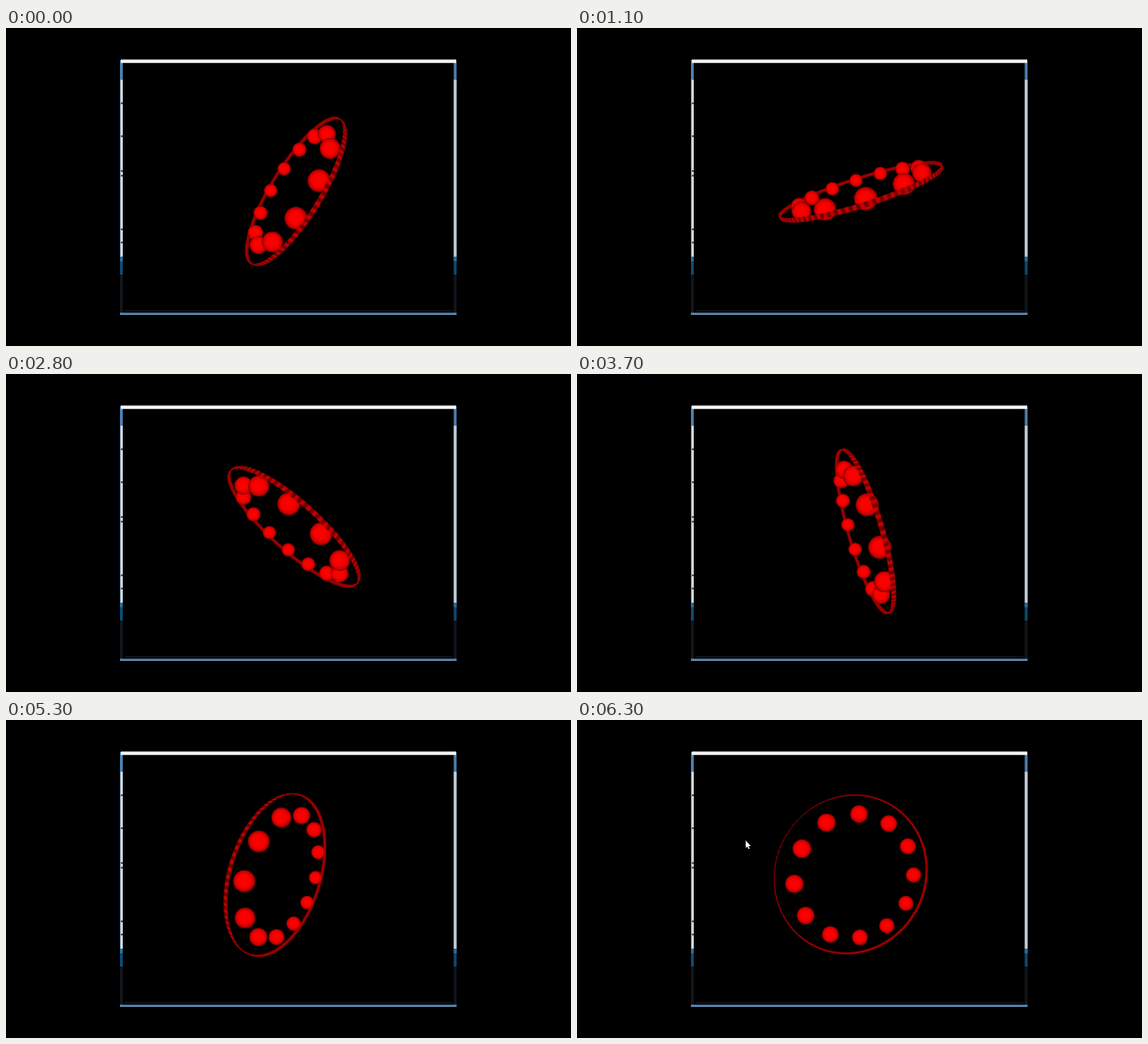
An HTML page with a canvas for the animation above (6400 ms loop, 600 px wide and 338 px high).

```html
<!DOCTYPE html>
<html>
<head>
<meta charset="utf-8">
<style>
html, body { margin: 0; width: 100%; height: 100%; overflow: hidden; background: #000; }
canvas { display: block; width: 600px; height: 338px; }
</style>
</head>
<body>
<canvas id="stage" width="600" height="338"></canvas>
<script>
const ctx = document.getElementById('stage').getContext('2d');
const LOOP = 6400, STEP = 100;
const CENTER = { x: 300, y: 169 };
const CAMERA = 234;          // viewing distance, in stage pixels
const RING = 84.5, BAND = 3.6, FACETS = 192;
const ORBIT = 66.6, BALL = 9, BALLS = 12;

// time in seconds, ring normal (x right, y down, z to viewer), ball phase in degrees
const POSES = [
  [0, -0.82, -0.502, 0.276, 14.5],
  [1.1, -0.298, -0.943, 0.149, 1.6],
  [1.9, 0.169, -0.98, -0.09, -15],
  [2.8, 0.645, -0.717, -0.262, -43],
  [3.7, 0.944, -0.271, -0.185, -77],
  [4.2, 0.985, -0.03, -0.16, -90],
  [5.3, 0.82, 0.252, 0.513, -109.5],
  [6.3, 0.335, 0.176, 0.925, -120]
];

function slope(i, c) {
  const rate = k => (POSES[k + 1][c] - POSES[k][c]) / (POSES[k + 1][0] - POSES[k][0]);
  if (i === 0) return rate(0);
  if (i === POSES.length - 1) return rate(i - 1);
  const before = POSES[i][0] - POSES[i - 1][0], after = POSES[i + 1][0] - POSES[i][0];
  return (after * rate(i - 1) + before * rate(i)) / (before + after);
}

function poseAt(t) {
  let i = 0;
  while (i < POSES.length - 2 && t > POSES[i + 1][0]) i++;
  const a = POSES[i], b = POSES[i + 1], h = b[0] - a[0];
  const s = Math.min(1, (t - a[0]) / h), s2 = s * s, s3 = s2 * s;
  const hermite = c =>
    (2 * s3 - 3 * s2 + 1) * a[c] + (3 * s2 - 2 * s3) * b[c] +
    h * ((s3 - 2 * s2 + s) * slope(i, c) + (s3 - s2) * slope(i + 1, c));
  return { normal: unit([1, 2, 3].map(hermite)), phase: hermite(4) * Math.PI / 180 };
}

function unit(v) {
  const len = Math.hypot(...v);
  return v.map(k => k / len);
}

function cross(a, b) {
  return [a[1] * b[2] - a[2] * b[1], a[2] * b[0] - a[0] * b[2], a[0] * b[1] - a[1] * b[0]];
}

function project(p) {
  const k = CAMERA / (CAMERA - p[2]);
  return { x: CENTER.x + p[0] * k, y: CENTER.y + p[1] * k, k };
}

function rect(color, x, y, w, h) {
  ctx.fillStyle = color;
  ctx.fillRect(x, y, w, h);
}

function drawWindow() {
  rect('#000', 0, 0, 600, 338);
  for (const x of [121, 475.5]) {
    rect('#4c7fae', x, 34, 3, 21);
    rect('#d8dadc', x, 55, 3, 188);
    rect('#0f4a70', x, 243, 3, 19);
    rect('#11161c', x, 262, 3, 41);
  }
  rect('#5d88ad', 121, 55, 0.7, 188);
  rect('#5d88ad', 477.8, 55, 0.7, 188);
  rect('#2c6c94', 121, 243, 3, 5);
  rect('#2c6c94', 475.5, 243, 3, 5);
  for (const y of [79, 114, 151, 156, 213, 227]) rect('#55595e', 122, y, 2, 2);
  rect('#f2f2f2', 122, 33.5, 356, 3.7);
  rect('#16181b', 126, 300, 348, 1.2);
  rect('#5b86ad', 121, 302.6, 357.5, 2.4);
}

function drawBall(p) {
  const { x, y, k } = project(p), r = BALL * k;
  const shade = ctx.createRadialGradient(x - r * 0.12, y - r * 0.1, 0, x, y, r);
  shade.addColorStop(0, '#ff0000');
  shade.addColorStop(0.55, '#f80000');
  shade.addColorStop(0.82, '#d00000');
  shade.addColorStop(1, '#780000');
  ctx.fillStyle = shade;
  ctx.beginPath();
  ctx.arc(x, y, r, 0, 2 * Math.PI);
  ctx.fill();
}

function drawFacet(corners, color) {
  ctx.beginPath();
  for (const c of corners) {
    const { x, y } = project(c);
    ctx.lineTo(x, y);
  }
  ctx.closePath();
  ctx.fillStyle = ctx.strokeStyle = color;
  ctx.lineWidth = 0.5;
  ctx.fill();
  ctx.stroke();
}

function drawRing(t) {
  const { normal: n, phase } = poseAt(t);
  const near = unit([-n[0] * n[2], -n[1] * n[2], 1 - n[2] * n[2]]);
  const side = cross(near, n);
  const radial = a => near.map((v, i) => v * Math.cos(a) + side[i] * Math.sin(a));
  const at = (a, r, lift) => radial(a).map((v, i) => v * r + n[i] * lift);
  const parts = [];

  for (let i = 0; i < BALLS; i++) {
    const p = at(phase + i * 2 * Math.PI / BALLS, ORBIT, 0);
    parts.push({ z: p[2], draw: () => drawBall(p) });
  }
  for (let i = 0; i < FACETS; i++) {
    const a = phase + i * 2 * Math.PI / FACETS, b = a + 2 * Math.PI / FACETS;
    const mid = radial((a + b) / 2);
    const outside = mid[2] > RING / CAMERA;
    const color = outside ? (i % 2 ? '#700000' : '#c40000') : '#a00000';
    const corners = [at(a, RING, -BAND / 2), at(b, RING, -BAND / 2),
                     at(b, RING, BAND / 2), at(a, RING, BAND / 2)];
    parts.push({ z: mid[2] * RING, draw: () => drawFacet(corners, color) });
  }
  parts.sort((p, q) => p.z - q.z).forEach(p => p.draw());
}

function drawCursor(t) {
  if (t < 5.8) return;
  const s = Math.min(1, (t - 5.8) / 0.4), ease = s * (2 - s);
  ctx.save();
  ctx.translate(122 + 57.2 * ease, 70 + 58 * ease);
  ctx.fillStyle = '#fff';
  ctx.fill(new Path2D('M0 0V8L1.8 6.4L3 9.2L4.2 8.7L3 6H5.4Z'));
  ctx.restore();
}

function frame(now) {
  const t = Math.floor((now % LOOP) / STEP) * STEP / 1000;
  drawWindow();
  drawRing(t);
  drawCursor(t);
  requestAnimationFrame(frame);
}
frame(0);
</script>
</body>
</html>
```
